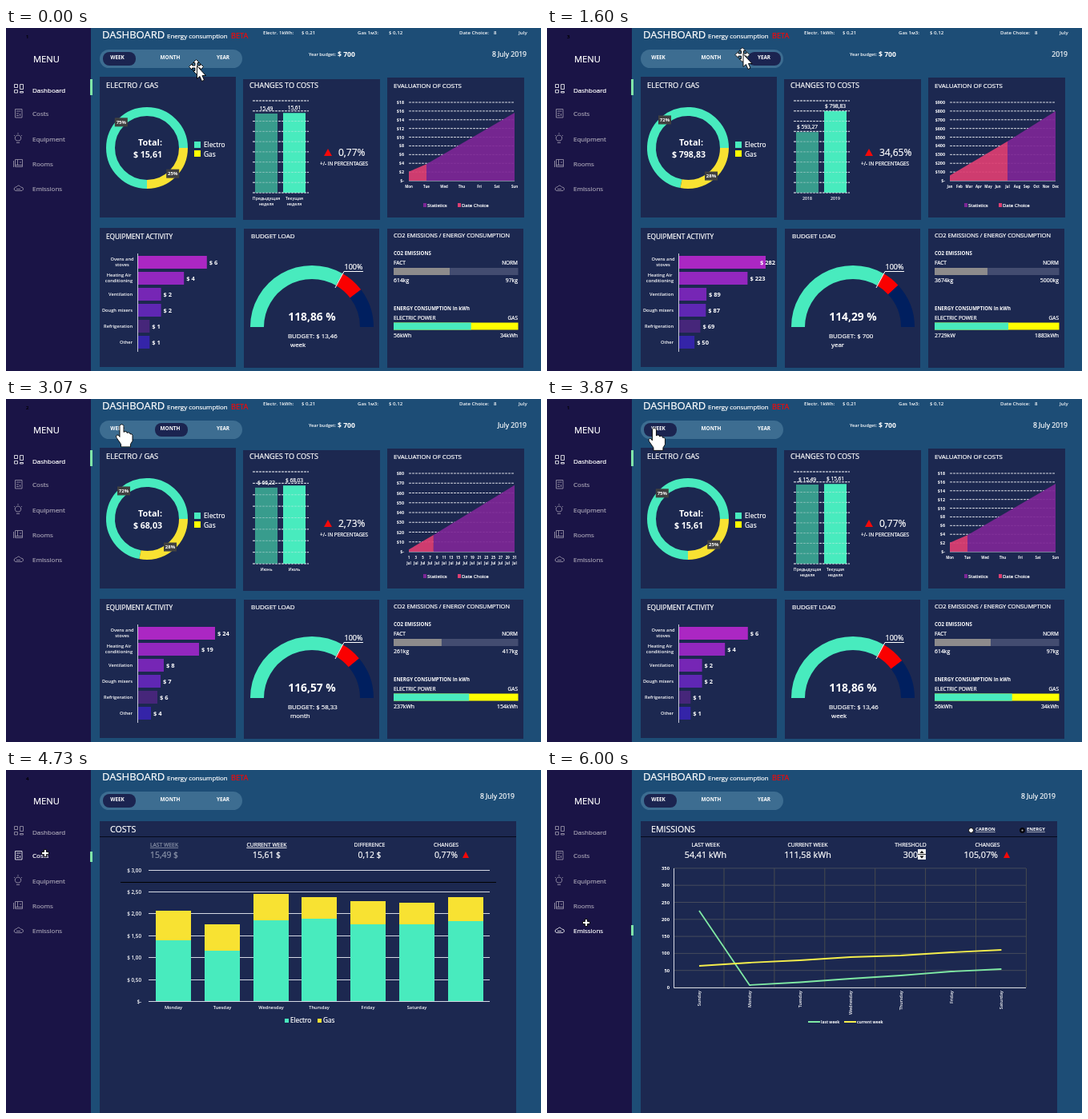
An HTML page that plays this animation: 668x429 px, repeating every 6070 ms.

```html
<!DOCTYPE html>
<html lang="en">
<head>
<meta charset="utf-8">
<style>
html, body { margin: 0; width: 100%; height: 100%; overflow: hidden; background: #1d4d76; }
svg { display: block; font-family: "Open Sans", "Noto Sans", sans-serif; }
</style>
</head>
<body>
<svg id="stage" width="668" height="429" viewBox="0 0 668 429"></svg>
<script>
const LOOP = 6070, STEPS = 91;
const GREEN = '#48ebbe', YELLOW = '#f8e232', PANEL = '#1c2850', DIM = '#a29eb0', RED = '#f50808';
const MID = 'middle', END = 'end';

// Drawing helpers, all returning SVG markup
const rect = (x, y, w, h, fill, extra = '') =>
  `<rect x="${x}" y="${y}" width="${w}" height="${h}" fill="${fill}" ${extra}/>`;
const line = (x1, y1, x2, y2, color = '#fff', extra = '') =>
  `<path d="M${x1} ${y1}L${x2} ${y2}" stroke="${color}" fill="none" ${extra}/>`;
const shape = (d, fill, extra = '') => `<path d="${d}" fill="${fill}" ${extra}/>`;
const group = (inner, attrs) => `<g ${attrs}>${inner}</g>`;
// A hairline stroke keeps small regular text crisp
const text = (x, y, str, size, anchor = 'start', fill = '#fff', weight = 400, extra = '') =>
  `<text x="${x}" y="${y}" font-size="${size}" text-anchor="${anchor}" fill="${fill}" font-weight="${weight}" stroke="${fill}" stroke-width="${weight > 400 ? 0 : .22}" ${extra}>${str}</text>`;
const bold = (x, y, str, size, anchor, fill) => text(x, y, str, size, anchor, fill, 700);
const each = (list, fn) => Array.from(list, fn).join('');
const count = (n, fn) => each({ length: n }, (_, i) => fn(i));
const polar = (cx, cy, r, deg) => {
  const a = deg * Math.PI / 180;
  return [cx + r * Math.cos(a), cy + r * Math.sin(a)];
};
const ring = (cx, cy, r, width, from, to, color) =>
  shape(`M${polar(cx, cy, r, from)}A${r} ${r} 0 ${to - from > 180 ? 1 : 0} 1 ${polar(cx, cy, r, to)}`,
    'none', `stroke="${color}" stroke-width="${width}"`);
const triangle = (x, y, w, h) => shape(`M${x} ${y}h${w}l${-w / 2} ${-h}z`, RED);
const money = n => '$ ' + n.toFixed(2).replace('.', ',');

const MENU = [['Dashboard', 81], ['Costs', 110], ['Equipment', 142], ['Rooms', 173], ['Emissions', 204]];
const ICONS = [
  'M10.5 70.5h4v4h-4zM17.5 70.5h4v6h-4zM10.5 77.5h4v3.5h-4zM17.5 79.5h4v1.5h-4z',
  'M11.5 101.5h8.5v10.5h-8.5zM13 104h5.5M13 107h3M13 109.5h3M17.5 107v3',
  'M13 141q-2.5-2-1.5-5q3.5-4 7 0q1 3-1.5 5zM13 143.5h4M15 131v1.5M10 134l1 1M20 134l-1 1',
  'M11.5 164.5h9v9h-9zM9.5 166v8M11.5 171.5h9M14.5 164.5v7M17 168h2',
  'M12 203.5q-3-1-1.5-3.5q1.5-1.5 2.5-1q2.5-4 5.5 0q3.5 0 3 3l-1.5 1.5zM13 201.5h5'
];

const VIEWS = {
  week: {
    id: 1, pill: 121, date: '8 July 2019', gas: 25, bars: [15.49, 15.61], max: 18, step: 2,
    names: [['Предыдущая', 'неделя'], ['Текущая', 'неделя']], change: '0,77%',
    days: 'Mon Tue Wed Thu Fri Sat Sun'.split(' '), curve: [2.07, 3.83, 15.61], chosen: 1 / 6,
    equipment: [6, 4, 2, 2, 1, 1], scale: 14.3, load: 118.86, budget: '13,46', unit: 'week',
    co2: ['614kg', '97kg', .45], energy: ['56kWh', '34kWh', .622]
  },
  year: {
    id: 3, pill: 251, date: '2019', gas: 28, bars: [593.27, 798.83], max: 900, step: 100,
    names: [['2018'], ['2019']], change: '34,65%',
    days: 'Jan Feb Mar Apr May Jun Jul Aug Sep Oct Nov Dec'.split(' '), curve: [60, 452, 798.83], chosen: 6 / 11,
    equipment: [282, 223, 89, 87, 69, 50], scale: .383, load: 114.29, budget: '700', unit: 'year',
    co2: ['3674kg', '5000kg', .424], energy: ['2729kW', '1883kWh', .592]
  },
  month: {
    id: 2, pill: 186, date: 'July 2019', gas: 28, bars: [66.22, 68.03], max: 80, step: 10,
    names: [['Июнь'], ['Июль']], change: '2,73%',
    days: Array.from({ length: 16 }, (_, i) => 2 * i + 1), curve: [2.2, 17.1, 68.03], chosen: 7 / 30,
    equipment: [24, 19, 8, 7, 6, 4], scale: 4, load: 116.57, budget: '58,33', unit: 'month',
    co2: ['261kg', '417kg', .385], energy: ['237kWh', '154kWh', .606]
  }
};
// [step when the header switches, step when the charts switch, view]
const SWITCHES = [[-99, -99, 'week'], [11, 13, 'year'], [31, 33, 'month'], [49, 52, 'week']];
const FADE = [.1, .5, .85, 1];

function sidebar(active, icons) {
  const marker = [[64, 20], [102, 13], , , [194, 13]][active];
  return rect(0, 0, 106, 429, '#1a1446') + text(34, 43, 'MENU', 11.2) +
    rect(105, marker[0], 3, marker[1], '#7fe6a8') +
    each(MENU, ([name, y], i) => {
      const color = i === active ? '#fff' : DIM;
      return text(33, y, name, 8, 'start', color) +
        (icons ? shape(ICONS[i], 'none', `stroke="${color}" stroke-width=".8"`) : '');
    });
}

const heading = () => text(120, 13, 'DASHBOARD', 13) + text(201, 13, 'Energy consumption', 7.9) +
  text(281, 13, 'BETA', 9.2, 'start', RED);

const pills = x => rect(117, 27, 178, 23, '#3d6d91', 'rx="11.5"') + rect(x, 30, 41, 17, '#1b2450', 'rx="8"') +
  each([['WEEK', 139], ['MONTH', 205], ['YEAR', 271]], ([s, cx]) => bold(cx, 39, s, 6.4, MID));

function prices(view) {
  return each([[321, 'Electr. 1kWh:'], [369, '$ 0,21'], [439, 'Gas 1м3:'], [478, '$ 0,12'],
    [566, 'Date Choice:'], [609, '8'], [640, 'July']], ([x, s]) => text(x, 8, s, 6.1, 'start', '#fff', 600)) +
    text(378, 35, 'Year budget:', 5.6, 'start', '#fff', 600) + bold(414, 36, '$ 700', 8.6) +
    text(650, 36, view.date, 8.6, END) + text(25, 13, view.id, 6, 'start', '#000');
}

function donut(v) {
  const split = v.gas * 3.6;
  const tag = (angle, n) => {
    const [x, y] = polar(176, 150, 45.5, angle);
    return rect(x - 8, y - 5.5, 16, 11, '#404040') + bold(x, y + 2.2, n + '%', 6, MID);
  };
  return ring(176, 150, 45.5, 11, split, 360, GREEN) + ring(176, 150, 45.5, 11, 0, split, YELLOW) +
    tag(split / 2 + 180, 100 - v.gas) + tag(split / 2, v.gas);
}

function equipment(v) {
  const colors = ['#ab27c3', '#9327bf', '#7626b5', '#5f27b4', '#46267a', '#3424a8'];
  return each(v.equipment, (n, i) => {
    const w = n * v.scale, y = 285 + 20 * i;
    return rect(165, y, w, 16, colors[i]) + bold(Math.min(168 + w, 266), y + 11, '$ ' + n, 7.5);
  });
}

const crossfade = (draw, before, after, p) =>
  group(draw(before), `opacity="${Math.min(1, 2 - 2 * p)}"`) + group(draw(after), `opacity="${p}"`);

const change = v => rect(296, 64, 171, 176, PANEL) + triangle(397, 160, 10, 9) +
  text(415, 160, v.change, 12) + text(392, 172, '+/- IN PERCENTAGES', 6.35);

function comparison(v, sign) {
  const y = n => 206 - 115 * n / v.max;
  const grid = count(v.max / v.step + 1, i => line(308, y(i * v.step), 378, y(i * v.step), '#e8eaf0', 'stroke-width=".9" stroke-dasharray="3 1"'));
  return text(304, 75, 'CHANGES TO COSTS', 9.1) + grid +
    each(v.bars, (n, i) => {
      const x = 311 + 35 * i, label = money(n);
      return rect(x, y(n), 28, 206 - y(n), i ? GREEN : '#389c8d') +
        text(x + 14, y(n) - 4, sign ? label : label.slice(2), 6.6, MID) +
        each(v.names[i], (s, k) => text(x + 14, 215 + 7 * k, s, 5.2, MID, '#fff', 600));
    }) + group(grid, 'opacity=".45"');
}

function evaluation(v) {
  const y = n => 191 - 98 * n / v.max, xc = 503 + 132 * v.chosen, [a, b, c] = v.curve.map(y);
  return text(484, 75, 'EVALUATION OF COSTS', 7.9) +
    count(v.max / v.step + 1, i => {
      const gy = y(i * v.step);
      return line(503, gy, 635, gy, '#e8eaf0', `stroke-width=".9" ${i ? 'stroke-dasharray="3 1"' : ''}`) +
        bold(497, gy + 2, i ? '$' + i * v.step : '$-', 5.4, END);
    }) +
    group(shape(`M${xc} 191V${b}L635 ${c}V191z`, '#7c2695') + shape(`M503 191V${a}L${xc} ${b}V191z`, '#dc3e72'), 'opacity=".93"') +
    each(v.days, (d, i) => {
      const x = 503 + 132 * i / (v.days.length - 1);
      return bold(x, 200, d, 4.4, MID) + (v.unit === 'month' ? bold(x, 207, 'Jul', 4.4, MID) : '');
    }) +
    rect(521, 219, 4, 5, '#7c2695') + text(526, 224, 'Statistics', 6) +
    rect(564, 219, 4, 5, '#dc3e72') + text(569, 224, 'Date Choice', 6);
}

function gauge(v) {
  const over = -60 + (v.load - 100) * 1.2;
  const arc = (from, to, color) => ring(382, 374, 68.5, 17, from, to, color);
  return text(306, 263, 'BUDGET LOAD', 8) + arc(180, 300, GREEN) + arc(-60, over, '#fa0000') + arc(over, 0, '#001f5f') +
    shape('M411 325L422 304.5H446', 'none', 'stroke="#fff"') + text(434, 302, '100%', 9, MID) +
    bold(382, 366, v.load.toFixed(2).replace('.', ',') + ' %', 13.8, MID) +
    text(352, 388, 'BUDGET: $ ' + v.budget, 7.9) + text(355, 399, v.unit, 7.9);
}

function ratio(y, title, left, right, [a, b, share], c1, c2) {
  return bold(484, y, title, 6.1) + text(484, y + 12, left, 6.5) + text(639, y + 12, right, 6.5, END) +
    rect(484, y + 16, 155.5, 9, c2) + rect(484, y + 16, 155.5 * share, 9, c1) +
    text(484, y + 34, a, 6.9) + text(639, y + 34, b, 6.9, END);
}

function dashboard(f) {
  const last = k => SWITCHES.findLastIndex(s => f >= s[k]);
  const head = VIEWS[SWITCHES[last(0)][2]], at = last(1), [, start, name] = SWITCHES[at];
  const v = VIEWS[name], old = VIEWS[SWITCHES[Math.max(0, at - 1)][2]];
  const p = FADE[Math.min(3, f - start)];
  const top = sidebar(0, f !== 69) + heading() + prices(head) + change(head);
  if (f === 69) return top;
  const labels = [['Ovens and', 145, 291], ['stoves', 145, 298], ['Heating Air', 141, 311], ['conditioning', 141, 318]];
  return top + pills(v.pill) +
    each([[117, 61, 170, 176], [476, 62, 171, 175], [117, 250, 170, 174], [297, 251, 169, 174], [476, 251, 170, 174]],
      b => rect(...b, PANEL)) +
    text(125, 75, 'ELECTRO / GAS', 9.3) + crossfade(donut, old, v, p) +
    bold(180, 147, 'Total:', 10.9, MID) + bold(177, 162, money(v.bars[1]), 10.6, MID) +
    rect(235, 142, 8, 8, GREEN) + text(247, 149, 'Electro', 8.3) +
    rect(235, 153, 8, 8, '#ff0') + text(247, 161, 'Gas', 8.3) +
    comparison(v, at > 0) + evaluation(v) +
    text(125, 264, 'EQUIPMENT ACTIVITY', 8.3) +
    each(labels, ([s, x, y]) => text(x, y, s, 5.7, MID, '#fff', 600)) +
    each(['Ventilation', 'Dough mixers', 'Refrigeration', 'Other'], (s, i) => text(158, 335 + 20 * i, s, 5.7, END, '#fff', 600)) +
    crossfade(equipment, old, v, p) + line(164.5, 282, 164.5, 405, '#c8cad8') +
    gauge(v) + text(484, 262, 'CO2 EMISSIONS / ENERGY CONSUMPTION', 7.4) +
    ratio(284, 'CO2 EMISSIONS', 'FACT', 'NORM', v.co2, '#8d8b8c', '#434c70') +
    ratio(352.5, 'ENERGY CONSUMPTION In kWh', 'ELECTRIC POWER', 'GAS', v.energy, GREEN, '#ff0');
}

const page = (active, title) => sidebar(active, true) + heading() + pills(121) +
  text(635, 36, '8 July 2019', 8.6, END) + rect(117, 64, 520, 365, PANEL) +
  text(130, 78, title, 10.6) + line(117, 83.5, 637, 83.5, '#060a1c') + triangle(570, 110, 8, 8);

const summary = (cols, size, underlined) => each(cols, ([label, value, x, color], i) =>
  text(x, 96, label, 6.8, MID, color, 400, i < underlined ? 'text-decoration="underline"' : '') +
  text(x, 110, value, size, MID, color));

function costs() {
  const electro = [213, 226, 188, 186, 193, 193, 189], total = [176, 193, 155, 159, 164, 166, 159];
  const days = ['Monday', 'Tuesday', 'Wednesday', 'Thursday', 'Friday', 'Saturday', ''];
  return page(1, 'COSTS') + text(25, 13, 4, 6, 'start', '#000') +
    summary([['LAST WEEK', '15,49 $', 197.5, '#8a93a8'], ['CURRENT WEEK', '15,61 $', 325.5],
      ['DIFFERENCE', '0,12 $', 454], ['CHANGES', '0,77%', 549.5]], 10.4, 2) +
    count(7, i => {
      const y = 290 - 27.4 * i;
      return line(178, Math.round(y) - .5, 604, Math.round(y) - .5, '#d5d9e4') +
        text(169, y + 2, i ? money(i / 2) : '$-', 6.3, END, '#fff', 600);
    }) + line(143, 140.5, 612, 140.5, '#000') +
    each(days, (d, i) => {
      const x = Math.round(187 + 60.8 * i);
      return rect(x, total[i], 44, electro[i] - total[i], YELLOW) + rect(x, electro[i], 44, 289 - electro[i], GREEN) +
        text(x + 22, 298.5, d, 5.7, MID, '#fff', 600);
    }) +
    rect(348, 311, 5, 5, GREEN) + text(355, 316, 'Electro', 8.2) + rect(389, 311, 5, 5, YELLOW) + text(396, 316, 'Gas', 8.2);
}

function emissions() {
  const days = ['Sunday', 'Monday', 'Tuesday', 'Wednesday', 'Thursday', 'Friday', 'Saturday'];
  const x = i => 190 + 62.9 * i;
  const series = (ys, color) => `<polyline points="${ys.map((y, i) => x(i) + ',' + y).join(' ')}" fill="none" stroke="${color}" stroke-width="1.8" stroke-linejoin="round"/>`;
  const radio = (cx, label, fill, dot) => `<circle cx="${cx}" cy="75.5" r="3" fill="${fill}" stroke="#000"/><circle cx="${cx}" cy="75.5" r="1" fill="${dot}"/>` +
    text(cx + 5.5, 76, label, 5.8, 'start', '#fff', 700, 'text-decoration="underline"');
  return page(4, 'EMISSIONS') + radio(529.5, 'CARBON', '#fff', '#fff') + radio(593.5, 'ENERGY', '#0a0a14', '#bbb') +
    summary([['LAST WEEK', '54,41 kWh', 198], ['CURRENT WEEK', '111,58 kWh', 325.5],
      ['THRESHOLD', '300', 454], ['CHANGES', '', 550]], 10.8, 0) +
    text(563, 110, '105,07%', 10.8, END) +
    rect(463, 99, 10, 13, '#eee') + line(463, 105.5, 473, 105.5, '#333') + shape('M465.5 104l2.5-3 2.5 3zM465.5 107.5l2.5 3 2.5-3z', '#000') +
    count(8, i => {
      const y = 272 - 21.3 * i;
      return line(158, y, 598, y, '#505560', 'stroke-width=".8"') + bold(153, y + 2, i * 50, 5.8, END);
    }) +
    count(7, i => line(x(i) + 31, 123, x(i) + 31, 272, '#4c4f50', 'stroke-width=".9"')) +
    shape('M158.5 123V272.5H598', 'none', 'stroke="#d5d9e4"') +
    series([176, 269, 265.5, 261, 257, 252, 249], '#7fe9a4') + series([245, 241, 238, 234, 232, 228, 225], '#f5ee4c') +
    each(days, (d, i) => text(0, 0, d, 5.4, END, '#fff', 600, `transform="translate(${x(i) + 2} 276) rotate(-90)"`)) +
    line(326, 315, 341, 315, '#7fe9a4', 'stroke-width="2"') + bold(342, 317, 'last week', 4.9) +
    line(371, 315, 386, 315, '#f5ee4c', 'stroke-width="2"') + bold(387, 317, 'current week', 4.9);
}

// Pointer shapes, hot spot at the origin
const POINTERS = {
  hand: ['M-2.5 2Q0-1.5 2.5 2V10q2-2 4 0v1q2-1.5 4 .5v1q2.5-1 3 1.5V21l-2.5 4v3.5H-1V25L-6.5 17q-1.5-3 1-3.5q2 0 3 2.5z'],
  move: ['M0-9l4 4h-2.5v3.5h3.5v-2.5l4 4-4 4v-2.5h-3.5v3.5h2.5l-4 4-4-4h2.5v-3.5h-3.5v2.5l-4-4 4-4v2.5h3.5v-3.5h-2.5z',
    'M1-1V15l3.5-3 2.5 6 3-1.3-2.5-5.7H12z'],
  plus: ['M-1.5-4.5h3v3h3v3h-3v3h-3v-3h-3v-3h3z']
};
// [from step, to step, x0, y0, x1, y1, lift, pointer on the way, hand until, hand after]
const MOVES = [
  [0, 9, 237.5, 48.5, 279, 37, 8, 'move', -1, .5],
  [19, 29, 279, 37, 209, 38, 4, 'move', .3, .7],
  [38, 48, 209, 38, 137, 33.5, 8, 'move', .3, .7],
  [57, 66, 137, 33.5, 48, 103, 0, 'plus', .3, .8],
  [75, 85, 49, 104, 53, 191, 0, 'plus', .25, .7]
];
function pointer(f) {
  if (f >= 68 && f <= 70) return ring(49, 103, 9.5, 5, 0, 180, '#2a9df0') + ring(49, 103, 9.5, 5, 180, 360, '#2088dc');
  let kind = 'plus', x = 49, y = 104;
  if (f >= 89) y = 191;
  else if (f >= 86) [kind, x, y] = ['hand', 49, 191];
  else if (f < 71 || f > 75) {
    const [a, b, x0, y0, x1, y1, lift, way, until, after] = MOVES.findLast(m => f >= m[0]);
    const t = Math.min(1, (f - a) / (b - a)), p = t * t * (3 - 2 * t);
    x = x0 + (x1 - x0) * p;
    y = y0 + (y1 - y0) * p - lift * Math.sin(Math.PI * p);
    kind = p < until || p > after ? 'hand' : way;
  }
  return group(each(POINTERS[kind], d => shape(d, '#fff', 'stroke="#000" stroke-width=".9"')), `transform="translate(${x} ${y})"`);
}

const stage = document.getElementById('stage');
let shown = -1;
function draw(now) {
  const f = Math.floor(now % LOOP / LOOP * STEPS + .1) % STEPS;
  if (f !== shown) {
    shown = f;
    stage.innerHTML = (f < 70 ? dashboard(f) : f < 89 ? costs() : emissions()) + pointer(f);
  }
  requestAnimationFrame(draw);
}
draw(performance.now());
</script>
</body>
</html>
```
